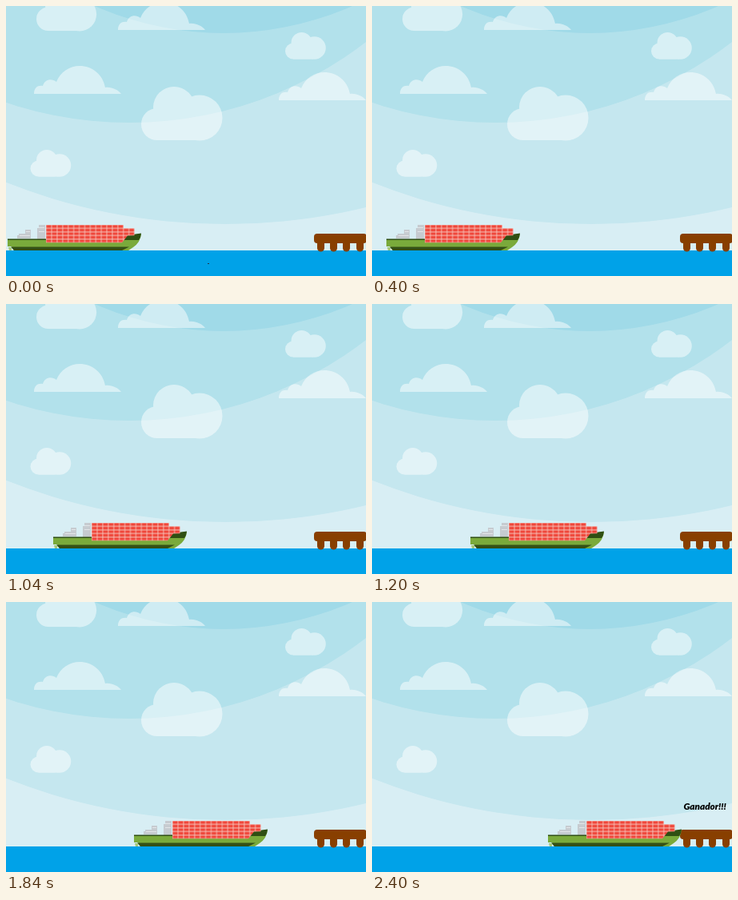
These frames come from a looping animation (450x338 px, 2.8 s). An HTML page:

```html
<!DOCTYPE html>
<html lang="es">
<head>
<meta charset="utf-8">
<title>Ganador</title>
<style>
  html, body { margin: 0; width: 100%; height: 100%; overflow: hidden; }
  svg { display: block; width: 100vw; height: 100vh; }
  text { font: italic 900 11.7px Lato, sans-serif; }
</style>
</head>
<body>
<svg viewBox="0 0 450 338" preserveAspectRatio="none">
  <defs>
    <g id="puffy">
      <rect y="27" width="80" height="40" rx="20"/>
      <circle cx="41" cy="26" r="26"/>
      <circle cx="73" cy="39" r="28.5"/>
      <rect x="20" y="36" width="50" height="31"/>
    </g>
    <path id="flat" d="M0 0C0-8 5-11 11-10C13-18 22-20 28-15C33-28 45-35 57-35C72-35 86-25 89-8C97-9 105-5 109 0Z"/>
    <pattern id="crates" width="6.9" height="4.5" patternUnits="userSpaceOnUse" x="48.2" y="273.8">
      <rect width="6.9" height="4.5" fill="#f6c3ba"/>
      <rect x=".4" y=".5" width="6" height="3.5" fill="#ef473b"/>
    </pattern>
  </defs>

  <rect width="450" height="338" fill="#d8eef4"/>
  <circle cx="274" cy="-473" r="746" fill="#c5e7ef"/>
  <circle cx="154" cy="-338" r="484" fill="#b2e1eb"/>
  <circle cx="272" cy="-364" r="398" fill="#a0dae8"/>

  <g fill="#fff">
    <g opacity=".5"><use href="#puffy" transform="translate(38 -18.5) scale(.74)"/></g>
    <g opacity=".5"><use href="#puffy" transform="translate(169 101)"/></g>
    <g opacity=".5"><use href="#puffy" transform="translate(349 33) scale(.5)"/></g>
    <g opacity=".5"><use href="#puffy" transform="translate(30.5 180) scale(.5)"/></g>
    <g opacity=".5">
      <use href="#flat" x="140" y="30"/>
      <use href="#flat" x="35" y="110"/>
      <use href="#flat" x="341" y="118"/>
    </g>
  </g>

  <rect y="306" width="450" height="32" fill="#00a2e8"/>
  <rect id="speck" width="2" height="1" fill="#234"/>

  <g fill="#883f00">
    <rect x="385" y="285" width="66" height="12" rx="4"/>
    <path d="M393.5 293V303M409.5 293V303M425.5 293V303M442.5 293V303" stroke="#883f00" stroke-width="9" stroke-linecap="round"/>
  </g>

  <g id="ship">
    <g fill="#c6cbd0">
      <path d="M12 291V287H14V285H22V280H29V291ZM37 291V278H39V274H47V292H37Z"/>
      <path d="M15 287.5H28M23 282.5H28M39 277.5H46M39 282.5H46" stroke="#e3e5e8"/>
    </g>
    <path d="M0 292H144L151 287L167 285Q166 296 157 302L151 306H8L5 301H0Z" fill="#7aaa3b"/>
    <path d="M0 291.5H143L150 287L167 284.5L166 289.5L164 293H0Z" fill="#2f4f13"/>
    <path d="M4 301.5H152L143 306H8Z" fill="#345016"/>
    <path d="M1 302H5V306H2Z" fill="#a5c878"/>
    <path d="M48 274H144.8V278.3H158.5V287.3L150 287.5L143 296.3H48Z" fill="url(#crates)"/>
  </g>

  <text id="cheer" x="389.5" y="260">Ganador!!!</text>
</svg>
<script>
const STEP = 400;
const shipStops = [2, 18, 59, 123, 160, 206, 220];
const specks = { 0: [252, 322], 5: [206, 328] };
const [ship, cheer, speck] = ['ship', 'cheer', 'speck'].map(id => document.getElementById(id));

function draw(now) {
  const step = Math.floor(now / STEP) % shipStops.length;
  ship.setAttribute('transform', `translate(${shipStops[step]} 0)`);
  cheer.style.display = step === shipStops.length - 1 ? '' : 'none';
  const spot = specks[step];
  speck.style.display = spot ? '' : 'none';
  if (spot) speck.setAttribute('transform', `translate(${spot})`);
}

const start = performance.now();
function tick() {
  draw(performance.now() - start);
  requestAnimationFrame(tick);
}
tick();
</script>
</body>
</html>
```
